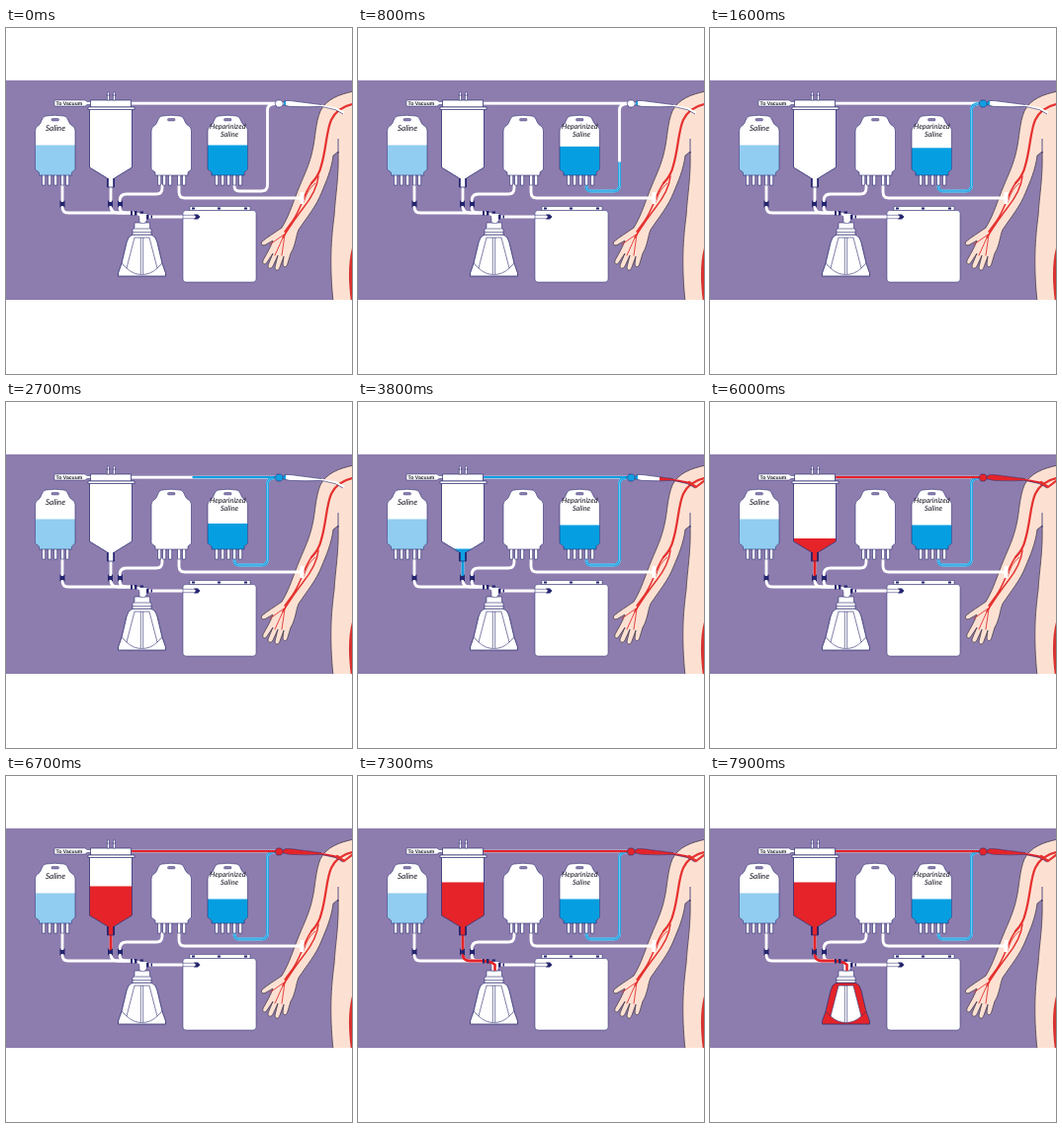
Recreate the animation shown at these times as an HTML page. Size 350 by 350 pixels, loop 8 s.

```html
<!DOCTYPE html>
<html lang="en">
<head>
<meta charset="utf-8">
<title>Blood salvage circuit</title>
<style>
html, body { margin: 0; width: 100%; height: 100%; overflow: hidden; background: #fff; }
svg { display: block; width: 350px; height: 350px; }
.ink { fill: none; stroke: #2b2b70; stroke-linejoin: round; }
.box { fill: #fff; stroke: #2b2b70; stroke-linejoin: round; }
.navy { fill: #25256f; }
.tube { fill: none; stroke: #fff; stroke-width: 2.8; }
.flow { fill: none; stroke-width: 2.8; }
.vein { fill: none; stroke: #e5322f; stroke-linecap: round; stroke-linejoin: round; }
text { text-rendering: geometricPrecision; fill: #20202c; }
.label { font-family: Lato, "Open Sans", sans-serif; font-style: italic; font-weight: 500; text-anchor: middle; }
</style>
</head>
<body>
<svg viewBox="0 0 350 350" stroke-width=".8">
  <defs>
    <path id="bag" d="M11 0Q20 -1.500 29 0C34 1 33 7 37 9.500Q40.500 11 40.500 15V54L37 57V60H4V57L0 54V15Q0 11 3.500 9.500C7 7 6 1 11 0Z"/>
    <path id="tank" d="M84.500 82H127.500V141L109.500 152V161H102.500V152L84.500 141Z"/>
    <path id="clamp" d="M-2.500-4L-1-2H1L2.500-4V4L1 2H-1L-2.500 4Z"/>
    <g id="suction">
      <path d="M127 75H273V77.200H127Z"/>
      <path d="M272 76L274 73H278L280 75V78L278 80H274Z"/>
      <path d="M280 75.200L283 73.400L288 73.600L305 75.800L319 77.600V79.400L304 79.800L287 79.400L280 77.800Z"/>
      <path d="M318 77.400L334 80.400L342.500 85L341.500 87L333 82.600L318 79.600Z"/>
    </g>
    <path id="hepTube" d="M231 150V160Q231 165 236 165H258Q264.500 165 264.500 159V83Q264.500 77 272 76.500"/>
    <path id="bell" d="M128 209Q123 211 122 217L117 238L113.500 248V251H161.500V248L158 238L153 217Q152 211 147 209Z"/>
    <path id="liner" d="M130 212L122 243Q129 249.500 137.500 249.500Q146 249.500 153 243L145 212Z"/>
    <clipPath id="bandClip"><rect y="53" width="350" height="222"/></clipPath>
    <clipPath id="bagClip"><use href="#bag"/></clipPath>
    <clipPath id="tankClip"><use href="#tank"/></clipPath>
    <clipPath id="blueClip"><rect id="blueWindow" y="60" height="40"/></clipPath>
    <clipPath id="redClip"><rect id="redWindow" y="60" height="40"/></clipPath>
    <clipPath id="bowlClip"><rect id="bowlWindow" x="110" y="208" width="60"/></clipPath>
  </defs>

  <rect width="350" height="350" fill="#fff"/>
  <rect y="53" width="350" height="222" fill="#8d7dae"/>

  <g clip-path="url(#bandClip)">
    <path fill="#fce1d3" stroke="#4c3e4e" stroke-linejoin="round" d="M352 64C337 67 324 72 318 84C313 96 313 111 310 124C307 138 302 148 297 160C291 174 287 189 279 202C272 207 265 211 259 216C257 219 260 221 263 219L270 215C268 221 264 228 260 235C259 239 262 240 264 237L270 228L265 240C265 244 268 244 270 241L275 230L272 242C272 246 276 246 277 242L281 231L280 239C281 243 284 242 285 238L288 228C293 220 293 211 296 204C304 192 314 180 319 167C324 155 329 144 331 129L336 125C337 150 333 171 332 190C329 213 327 238 331 277H352Z"/>
    <path class="ink" stroke="#4c3e4e" d="M336 112V127"/>
    <g class="vein">
      <path stroke-width="2.200" d="M351 77C341 79 333 85 329 93C324 104 324 122 319 139C317 148 314 152 309 157"/>
      <path stroke-width="1.500" d="M316 150C315 161 308 173 300 183C293 192 287 201 280 212M309 157C301 168 299 182 290 195L282 206"/>
      <path stroke-width=".9" d="M313 157C306 162 303 170 301 177M281 209L267 219M281 210L272 230M282 209L279 230"/>
    </g>
    <path fill="#d8322f" d="M351 219C346 235 346 255 349 277H352Z"/>
  </g>

  <g class="tube">
    <path d="M57 158V181Q57 187 63 187H129"/>
    <path d="M106 158V180Q106 187 113 187H129"/>
    <path d="M158 158V162Q158 168 152 168H122Q115 168 115 175V181Q115 187 121 187"/>
    <path d="M175 158V166Q175 172 181 172H299"/>
    <use href="#hepTube"/>
    <path d="M127 76.100H274"/>
    <path d="M145 191H193"/>
  </g>
  <rect x="297.500" y="166" width="4" height="12" fill="#fff"/>

  <use href="#suction" fill="#fff"/>
  <g id="hepFlow" class="flow">
    <use href="#hepTube" stroke="#109fe2"/>
    <use href="#hepTube" stroke="#8fd0f2" stroke-width=".8" style="stroke-width:.8"/>
  </g>
  <g clip-path="url(#blueClip)"><use href="#suction" fill="#109fe2"/></g>
  <g clip-path="url(#redClip)">
    <use href="#suction" fill="#e52329"/>
    <path class="vein" stroke-width="2.200" d="M335 81L342 86L351 79"/>
  </g>
  <path class="ink" stroke-width=".6" d="M272 76L274 73H278L280 75V78L278 80H274ZM280 75.200L283 73.400L288 73.600L305 75.800L319 77.600M280 77.800L287 79.400L304 79.800L319 79.400L333 82.600L341 87"/>

  <path id="stemFlow" class="flow"/>
  <path id="drainFlow" class="flow" stroke="#e52329" pathLength="1" d="M106 176V180Q106 187 113 187H129L138 190V198"/>

  <g id="bags"></g>
  <text class="label" x="50" y="103.500" font-size="8">Saline</text>
  <text class="label" x="224.300" y="102" font-size="7.300">Heparinized</text>
  <text class="label" x="226" y="109.500" font-size="7.300">Saline</text>

  <path class="box" stroke-width=".5" d="M49 73H80L82 74.500H86V77.500H82L80 79H49Z"/>
  <text x="50.500" y="78" font-size="5.100" font-weight="700" font-family="'Liberation Sans', Arial, sans-serif">To Vacuum</text>
  <use href="#tank" fill="#fff"/>
  <rect id="tankFill" x="82" width="49" height="80" clip-path="url(#tankClip)"/>
  <use href="#tank" class="ink"/>
  <path class="navy" d="M102 152H103.800V161H102ZM108.200 152H110V161H108.200Z"/>
  <path class="box" stroke-width=".7" d="M85.500 73H126.500V80H85.500Z"/>
  <path class="box" stroke-width=".7" d="M83 80H130V82.500H83Z"/>
  <path class="box" stroke-width=".5" d="M102.500 65H104.500V73H102.500ZM108.500 65H110.500V73H108.500ZM101.500 68H105.500M107.500 68H111.500"/>

  <g class="navy">
    <use href="#clamp" x="57" y="178"/>
    <use href="#clamp" x="105.500" y="178"/>
    <use href="#clamp" x="115.500" y="178"/>
  </g>

  <rect class="box" stroke-width=".5" x="179" y="184.500" width="74" height="72.500" rx="3"/>
  <path class="box" stroke-width=".5" d="M186 180.500H247V184.500H186Z"/>
  <path class="navy" d="M188 181.500H191V183.500H188ZM214 181.500H217V183.500H214ZM241 181.500H244V183.500H241Z"/>
  <path class="ink" stroke-width=".5" d="M179 189.300H191M179 192.700H191"/>
  <path class="navy" d="M190 188.500H194L196.500 191L194 193.500H190L192 191Z"/>

  <use href="#bell" fill="#fff"/>
  <g clip-path="url(#bowlClip)">
    <use href="#bell" fill="#e52329"/>
    <use href="#liner" fill="#fff"/>
  </g>
  <g class="ink">
    <use href="#bell"/>
    <use href="#liner" stroke-width=".6"/>
    <path stroke-width=".6" d="M136.300 212V249M138.700 212V249M117 238L122 243M158 238L153 243"/>
  </g>
  <path class="box" stroke-width=".6" d="M130 197H145.500V202L147 204V209H128V204L130 202Z"/>
  <path class="ink" stroke-width=".6" d="M129 203H146.500M128 206.500H147"/>
  <path class="box" stroke-width=".5" d="M134 187.500H143V193L141 197H135V193Z"/>
  <path id="joint" stroke-width="2.600" fill="none" d="M126 187L135 188.500L138.500 191V197"/>
  <path class="navy" d="M126 185H128V189.500H126ZM130 185H132.500V189.500H130ZM135.500 185.500H139V187.500H135.500ZM142 189H144V193.500H142ZM146.500 189.500H148V192.500H146.500Z"/>
</svg>

<script>
const LOOP = 8000, STEP = 100;
const BLUE = "#109fe2", RED = "#e52329";
const $ = id => document.getElementById(id);
const set = (id, attrs) => {
  for (const name in attrs) $(id).setAttribute(name, attrs[name]);
};

// x, offsets of the ports, liquid id, liquid colour
const bags = [
  [29.5, [8.5, 14.5, 20.5, 27.5, 32.5], "saline", "#91cdf1"],
  [147, [8, 13, 19, 28, 33], "spare", "none"],
  [204, [9, 15, 21, 27, 33], "heparin", "#059fe1"]
];
$("bags").innerHTML = bags.map(([x, ports, id, color]) => `
  <g transform="translate(${x} 89)">
    ${ports.map(p => `<rect class="box" stroke-width=".6" x="${p - 1.5}" y="59" width="3.2" height="11"/>`).join("")}
    <use href="#bag" fill="#fff"/>
    <rect id="${id}" y="29.5" width="41" height="31" fill="${color}" clip-path="url(#bagClip)"/>
    <use href="#bag" class="ink" stroke-width=".6"/>
    <rect x="16.5" y="2.5" width="7.5" height="2.5" rx="1" fill="#8d7dae" stroke="#2b2b70" stroke-width=".4"/>
  </g>`).join("");

// Linear interpolation through [time, value] pairs
function track(t, keys) {
  if (t <= keys[0][0]) return keys[0][1];
  for (let i = 1; i < keys.length; i++) {
    const [t0, a] = keys[i - 1], [t1, b] = keys[i];
    if (t <= t1) return a + (b - a) * (t - t0) / (t1 - t0);
  }
  return keys[keys.length - 1][1];
}

const hepLength = $("hepTube").getTotalLength();
const pour = (id, part, length) => set(id, {
  "stroke-dasharray": `${part * length} ${2 * length}`,
  visibility: part > 0 ? "visible" : "hidden"
});

function draw(t) {
  set("heparin", { y: track(t, [[0, 29.5], [1600, 32.3], [3800, 35.5]]) });
  pour("hepFlow", track(t, [[0, 0], [1500, 1]]), hepLength);

  const left = track(t, [[1400, 281], [1600, 272], [1900, 272], [3300, 126]]);
  set("blueWindow", { x: left, width: 283 - left });
  const front = track(t, [[3400, 350], [3800, 305], [4800, 197], [5450, 126]]);
  set("redWindow", { x: front, width: 350 - front });

  const liquid = t < 5500 ? BLUE : RED;
  set("tankFill", {
    y: track(t, [[3200, 161], [3500, 152], [3800, 148.5], [4800, 146], [5400, 144.5], [6000, 138], [6700, 111.5], [6800, 107.5]]),
    fill: liquid
  });
  set("stemFlow", {
    stroke: liquid,
    d: `M106 159V${track(t, [[3300, 159], [3700, 178]])}`
  });

  pour("drainFlow", track(t, [[6800, 0], [7300, 1]]), 1);
  set("joint", { stroke: t < 7200 ? "#fff" : RED });
  set("bowlWindow", { height: track(t, [[7300, 0], [7800, 44]]) });
}

const start = performance.now();
function tick() {
  const t = (performance.now() - start) % LOOP;
  draw(Math.floor(t / STEP) * STEP);
  requestAnimationFrame(tick);
}
tick();
</script>
</body>
</html>
```
